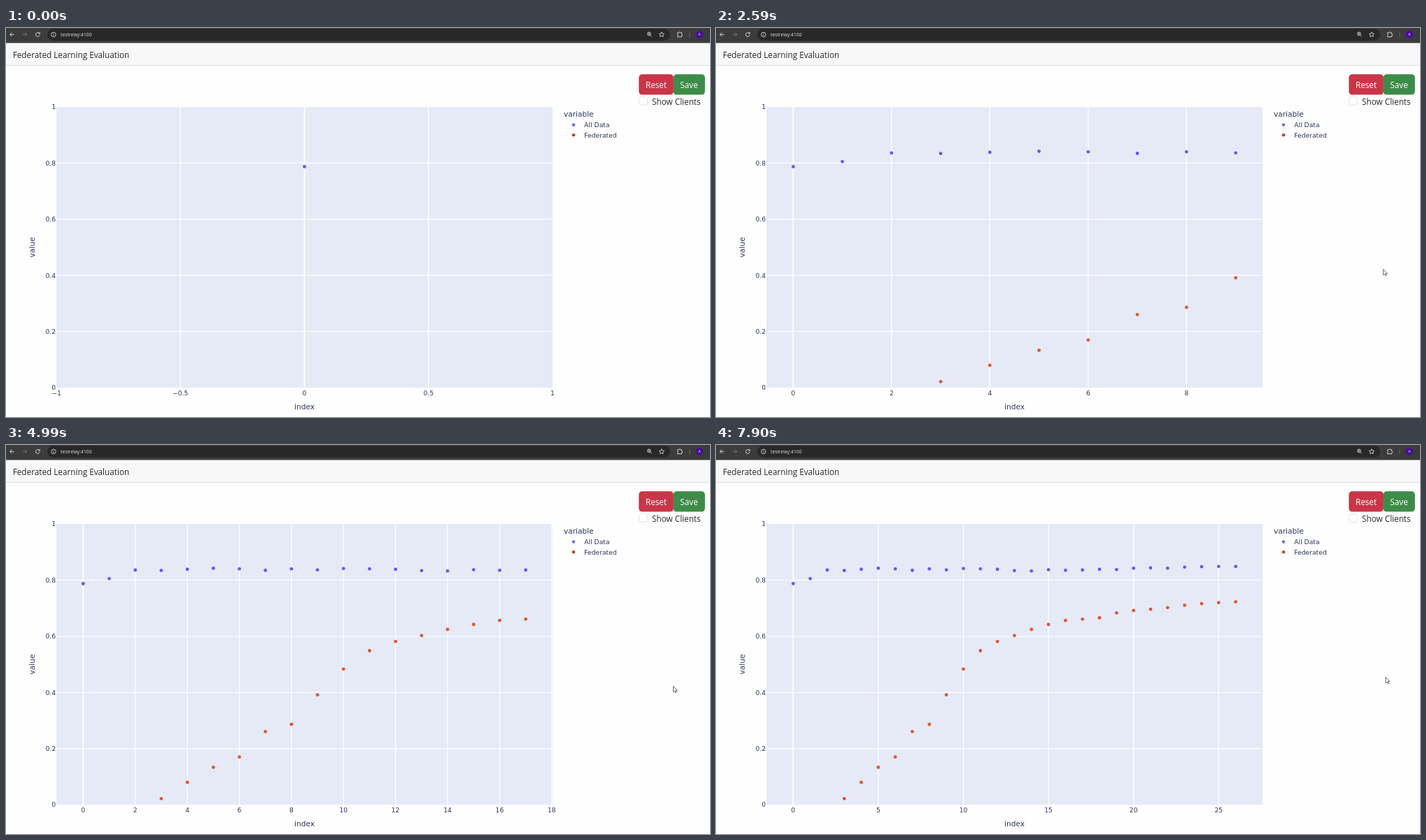
Recreate the animation shown at these times as an HTML page. Size 1006 by 557 pixels, loop 8 s.

```html
<!DOCTYPE html>
<html lang="en">
<head>
<meta charset="utf-8">
<title>Federated Learning Evaluation</title>
<style>
  html, body { margin: 0; width: 100%; height: 100%; overflow: hidden; background: #fefefe; }
  svg { display: block; }
  .ui { font: 11.75px "Open Sans", "Noto Sans", sans-serif; fill: #24282c; }
  .chart { font: 9.2px "DejaVu Sans", Verdana, sans-serif; fill: #2c3658; }
  .chart .title { font-size: 10.6px; }
  .mid { text-anchor: middle; }
  .end { text-anchor: end; }
  .icon { fill: none; stroke: #d6d6d6; stroke-width: 1; }
</style>
</head>
<body>
<svg width="1006" height="557" viewBox="0 0 1006 557">
  <rect width="1006" height="557" fill="#fefefe"/>

  <!-- browser bar -->
  <rect width="1006" height="21.7" fill="#3c3c3c"/>
  <rect x="59" y="1" width="890" height="17" rx="8.5" fill="#282828"/>
  <g class="icon">
    <path d="M11.5 9.3H5.8M8.4 6.5L5.6 9.3L8.4 12.1"/>
    <path d="M24 9.3H29.7M27.1 6.5L29.9 9.3L27.1 12.1" stroke="#777"/>
    <path d="M47.6 7.4A2.9 2.9 0 1 0 48.2 10.2M48.3 5.9V8.1H46"/>
    <circle cx="67.9" cy="9.4" r="3.3" stroke-width=".9"/>
    <path d="M67.9 8.9V11.2M67.9 7.2V8.1" stroke-width=".9"/>
    <circle cx="918.9" cy="8.3" r="2.3"/>
    <path d="M920.6 10L923 12.4M917.7 8.3H920.1M918.9 7.1V9.5" stroke-width=".8"/>
    <path d="M936.9 5.7L938 8L940.5 8.3L938.7 10L939.1 12.5L936.9 11.3L934.7 12.5L935.1 10L933.3 8.3L935.8 8Z" stroke-width=".9"/>
    <path d="M959.6 6.8H961.6A1.1 1.1 0 0 1 963.8 6.8H965.6V8.7A1.1 1.1 0 0 1 965.6 10.9V12.7H959.6V10.8A1.1 1.1 0 0 0 959.6 8.7Z"/>
    <path d="M977 6V13" stroke="#666"/>
  </g>
  <circle cx="990.9" cy="9.3" r="5.3" fill="#470d9c"/>
  <text class="ui mid" x="990.9" y="11.4" style="font-size:5.8px;fill:#eee">A</text>
  <text class="ui" x="78" y="11.8" style="font-size:6.8px;fill:#e2e2e2">testrelay:4100</text>

  <!-- page header and controls -->
  <rect y="21.7" width="1006" height="31.8" fill="#f8f8f8"/>
  <rect y="53" width="1006" height="1" fill="#dcdcdc"/>
  <text class="ui" x="9.7" y="43">Federated Learning Evaluation</text>
  <rect x="904.3" y="66.3" width="49.6" height="29.3" rx="4.8" fill="#c83648"/>
  <rect x="953.6" y="66.3" width="45.2" height="29.3" rx="4.8" fill="#3f8b49"/>
  <g class="ui" style="fill:#fff">
    <text class="mid" x="929" y="86.3">Reset</text>
    <text class="mid" x="976" y="86.3">Save</text>
  </g>
  <rect x="904.7" y="98.7" width="11.8" height="11.8" rx="3" fill="#fff" stroke="#e1e2e4"/>
  <text class="ui" x="923" y="109.8">Show Clients</text>

  <!-- chart -->
  <rect x="72" y="113" width="709" height="402" fill="#e6eaf6"/>
  <g class="chart">
    <g id="rows"></g>
    <g id="plot"></g>
    <text class="title mid" x="426.5" y="546.3">index</text>
    <text class="title mid" transform="translate(40.8 314) rotate(-90)">value</text>
    <text class="title" x="797" y="126.9">variable</text>
    <circle cx="811" cy="138.6" r="2.3" fill="#6f74ec"/>
    <text x="826.3" y="142">All Data</text>
    <circle cx="811" cy="153.3" r="2.3" fill="#c4432f"/>
    <text x="826.3" y="156.8">Federated</text>
  </g>

  <path id="cursor" d="M0 0V8.4L2 6.7L3.4 9.5L4.6 9L3.3 6.2H5.8Z" fill="#fff" stroke="#444" stroke-width=".8"/>
</svg>
<script>
const LOOP = 8000, LEFT = 72, RIGHT = 781, TOP = 113, BOTTOM = 515;
const FIRST_X = 110.3, LAST_X = 742.6, MAX_TICKS = 9.7;

// marker heights in stage pixels
const allData = [198.5, 191.3, 179, 179.7, 178, 176.5, 177.3, 179.5, 177.3, 178.8, 176.8, 177.3, 178, 179.8,
  180.4, 178.6, 179.4, 179, 178, 178.3, 176.4, 176, 176.4, 174.8, 174.2, 173.8, 173.9];
const federated = [506.3, 483, 461.5, 446.7, 410.3, 400, 357.7, 320.8, 294.5, 281.3, 272.8, 264,
  257, 251.2, 249.3, 247.5, 240.3, 237, 235.2, 232.8, 229.4, 227.2, 225.7, 224.6];
const FED_START = 3;

const el = id => document.getElementById(id);
const line = (x1, y1, x2, y2, w) =>
  `<path d="M${x1} ${y1}L${x2} ${y2}" stroke="#fff" stroke-width="${w}"/>`;
const label = (cls, x, y, v) =>
  `<text class="${cls}" x="${x}" y="${y}">${String(+v.toFixed(1)).replace('-', '\u2212')}</text>`;
const dot = (x, y, color) => `<circle cx="${x}" cy="${y}" r="2.4" fill="${color}"/>`;

function drawRows() {
  let out = '';
  for (let i = 0; i <= 5; i++) {
    const y = BOTTOM - (BOTTOM - TOP) * i / 5;
    if (i % 5) out += line(LEFT, y, RIGHT, y, 1.2);
    out += label('end', 71, y + 3.4, i / 5);
  }
  el('rows').innerHTML = out;
}

// smallest 1-2-5 step that keeps the tick count under the limit
function tickStep(range) {
  const rough = range / MAX_TICKS;
  const base = 10 ** Math.floor(Math.log10(rough));
  return base * [1, 2, 5, 10].find(m => m * base >= rough);
}

function drawPlot(last) {
  const mid = (LEFT + RIGHT) / 2;
  const unit = last ? (LAST_X - FIRST_X) / last : (RIGHT - LEFT) / 2;
  const zero = last ? FIRST_X : mid;
  const px = i => zero + i * unit;
  const lo = (LEFT - zero) / unit, hi = (RIGHT - zero) / unit;
  const step = tickStep(hi - lo);
  let out = '';
  for (let k = Math.ceil(lo / step - 1e-6); k * step <= hi + 1e-6; k++) {
    const x = px(k * step);
    if (x > LEFT + 1 && x < RIGHT - 1) out += line(x, TOP, x, BOTTOM, k ? 1.2 : 1.8);
    out += label('mid', x, 525.8, k * step);
  }
  for (let i = 0; i <= last; i++) {
    out += dot(px(i), allData[i], '#7052f2');
    if (i >= FED_START) out += dot(px(i), federated[i - FED_START], '#d95734');
  }
  el('plot').innerHTML = out;
}

function lastIndex(t) {
  if (t < 300) return 0;
  if (t < 5300) return 3 + Math.floor((t - 790) / 300);
  return Math.min(26, 18 + Math.floor((t - 5300) / 300));
}

function cursorAt(t) {
  if (t < 300) return [-20, -20];
  if (t < 390) return [987, 546];
  if (t < 490) return [970, 446];
  return t < 7900 ? [953.6, 345.4] : [957, 332.4];
}

let shown = -1;
function render(t) {
  const last = lastIndex(t);
  if (last !== shown) drawPlot(shown = last);
  el('cursor').setAttribute('transform', `translate(${cursorAt(t)})`);
}

drawRows();
render(0);
let start;
requestAnimationFrame(function tick(now) {
  start ??= now;
  render((now - start) % LOOP);
  requestAnimationFrame(tick);
});
</script>
</body>
</html>
```
